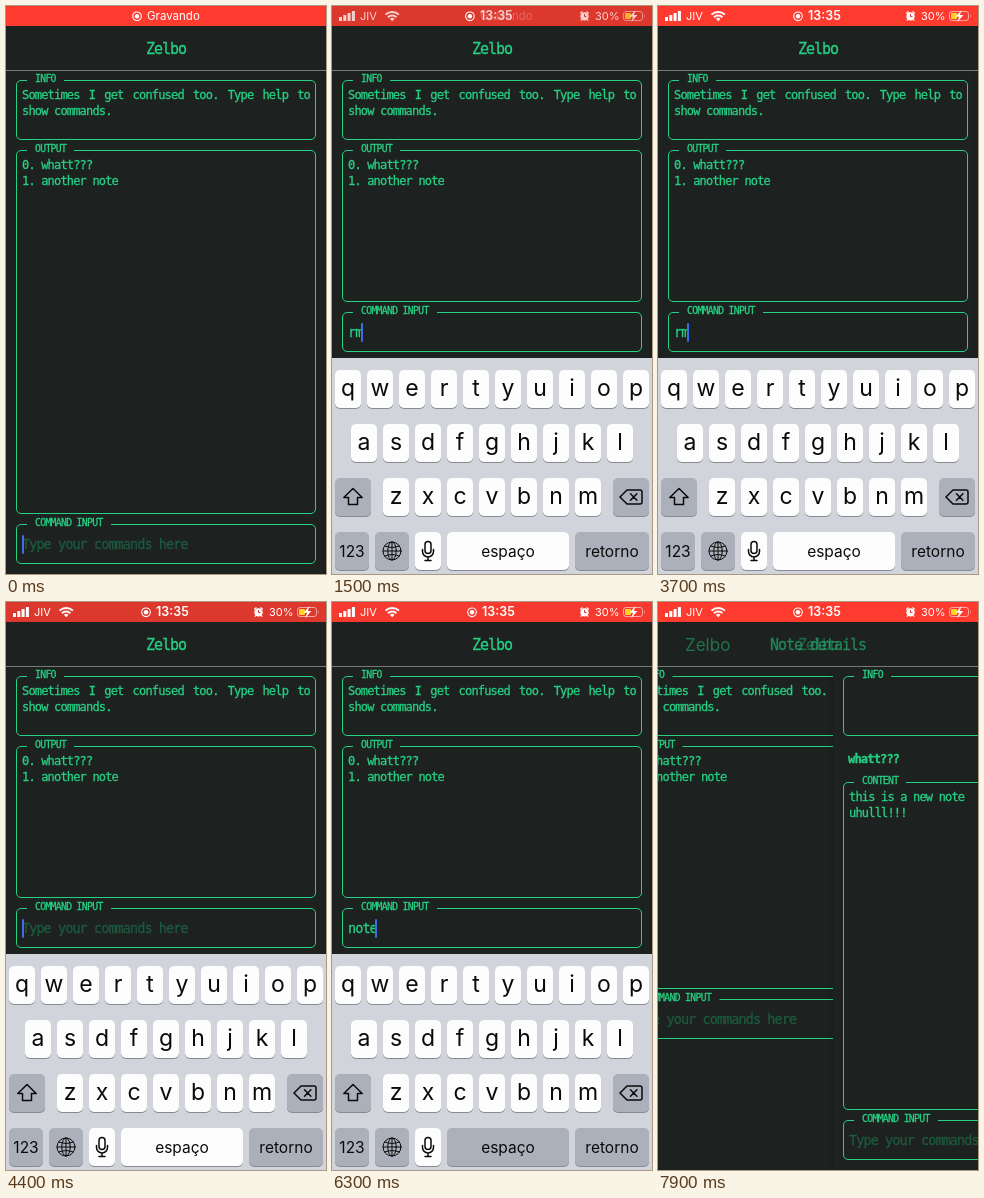
Write an HTML page that moves like this. It is 320x568 px and loops after 8 s.

```html
<!DOCTYPE html>
<html lang="pt">
<head>
<meta charset="utf-8">
<title>Terminal notes</title>
<style>
@property --kb { syntax: "<number>"; inherits: true; initial-value: 0; }
@property --lay { syntax: "<number>"; inherits: true; initial-value: 0; }
@property --push { syntax: "<number>"; inherits: true; initial-value: 0; }
@property --clock { syntax: "<number>"; inherits: true; initial-value: 0; }

html, body { margin: 0; width: 100%; height: 100%; overflow: hidden; background: #1d211f; }
#stage {
  --green: #25d184;
  --bg: #1d211f;
  position: absolute; left: 0; top: 0; width: 320px; height: 568px; overflow: hidden;
  background: var(--bg);
  animation: kb 8s infinite, lay 8s infinite, push 8s infinite, clock 8s linear infinite;
}
@keyframes kb {
  0%, .6% { --kb: 0; animation-timing-function: cubic-bezier(.2, .7, .3, 1); }
  5.5% { --kb: 1; }
  91.73% { --kb: 1; animation-timing-function: ease-in-out; }
  96%, 100% { --kb: 0; }
}
@keyframes lay {
  0%, .6% { --lay: 0; animation-timing-function: cubic-bezier(.2, .7, .3, 1); }
  5.5% { --lay: 1; }
  96.4% { --lay: 1; animation-timing-function: ease-in; }
  98.75% { --lay: .573; animation-timing-function: linear; }
  100% { --lay: .27; }
}
@keyframes push {
  0%, 96.4% { --push: 0; animation-timing-function: ease-in; }
  98.75% { --push: .45; animation-timing-function: linear; }
  100% { --push: .75; }
}
@keyframes clock {
  0%, 16% { --clock: 0; }
  19.6%, 100% { --clock: 1; }
}

/* Terminal type: each size has an advance of .5333em */
.term, .term * {
  font-family: "DejaVu Sans Mono", monospace;
  letter-spacing: calc(.5333em - 1ch);
  color: var(--green);
  -webkit-text-stroke: .3px;
}
.page { position: absolute; left: 0; top: 0; width: 320px; bottom: 0; background: var(--bg); }
#home { transform: translateX(calc(-96px * var(--push))); }
#home .panes { position: absolute; left: 0; right: 0; top: 0; bottom: calc(212px * var(--lay)); }
#detail { transform: translateX(calc(320px * (1 - var(--push)))); box-shadow: 0 0 5px #0003; }
.box {
  position: absolute; left: 10px; right: 10px; box-sizing: border-box;
  border: 1px solid var(--green); border-radius: 5px; padding: 6px 5px;
  font-size: 12px; line-height: 16px;
}
.box p { margin: 0; white-space: pre; }
.box p.fill { white-space: normal; text-align: justify; }
.box b {
  position: absolute; left: 10px; top: -9px; padding: 0 8px;
  font-size: 9.75px; line-height: 14px; font-weight: 400; background: var(--bg);
}
.info { top: 74px; height: 60px; }
.output { top: 144px; bottom: 60px; }
.content { top: 180px; bottom: 60px; }
.entry { bottom: 10px; height: 40px; padding: 0 5px; }
.entry p { font-size: 13.5px; line-height: 38px; }
.entry .hint { color: #1d5940; }
.name { position: absolute; left: 15px; top: 149px; font-size: 12px; line-height: 16px; font-weight: 700; }
#caret { position: absolute; top: 10px; width: 2px; height: 19px; border-radius: 1px; background: #3d6ce8; }

header { position: absolute; left: 0; top: 0; width: 320px; height: 64px; background: var(--bg); border-bottom: 1px solid #767b78; }
header div { position: absolute; top: 33px; width: 320px; text-align: center; font-size: 15px; line-height: 20px; }
#old { opacity: calc(1 - 1.4 * var(--push)); }
#new { opacity: calc(1.25 * var(--push)); }
header #back {
  left: 27px; width: auto; font: 17px/20px Inter, sans-serif; letter-spacing: 0;
  -webkit-text-stroke: 0; opacity: var(--push);
}

#status {
  position: absolute; left: 0; top: 0; width: 320px; height: 20px; color: #fff;
  background: color-mix(in srgb, #dc382e calc(var(--kb) * var(--dim, 0) * 100%), #ff3b30);
  font: 11px/20px Inter, sans-serif;
}
#status span, #status svg { position: absolute; top: 0; white-space: pre; }
#bars, .live { opacity: var(--clock); }
#rec { left: 0; transform: translateX(calc(126px + 9px * var(--clock))); }
#word { left: 15px; font-size: 11.5px; opacity: calc(1 - var(--clock)); }

#keys {
  position: absolute; left: 0; top: 352px; width: 320px; height: 216px; background: #d1d4da;
  transform: translateY(calc(217px * (1 - var(--kb))));
  font-family: Inter, sans-serif; color: #0a0a0b;
}
.key {
  position: absolute; height: 38px; box-sizing: border-box; border-radius: 5px;
  display: flex; align-items: center; justify-content: center;
  background: #fdfdfe; box-shadow: 0 1px 0 #888b91; font-size: 22px;
}
.key.letter { font-size: 23px; padding-bottom: 3px; }
.key.small { font-size: 15.5px; }
.key.tiny { font-size: 13.5px; }
.key.dark, .key.down { background: #abb0ba; }
#keys.sym .abc, #keys:not(.sym) .num { display: none; }
.key svg { fill: none; stroke: #0a0a0b; stroke-width: 1.5; stroke-linejoin: round; stroke-linecap: round; }
.key svg.thin { stroke-width: 1; }
</style>
</head>
<body>
<div id="stage">
  <div id="home" class="page term">
    <div class="panes">
      <div class="box info"><b>INFO</b><p class="fill">Sometimes I get confused too. Type help to show commands.</p></div>
      <div class="box output"><b>OUTPUT</b><p>0. whatt???
1. another note</p></div>
      <div class="box entry"><b>COMMAND INPUT</b><p id="typed"></p><i id="caret"></i></div>
    </div>
  </div>
  <div id="detail" class="page term">
    <div class="box info"><b>INFO</b></div>
    <div class="name">whatt???</div>
    <div class="box content"><b>CONTENT</b><p>this is a new note
uhulll!!!</p></div>
    <div class="box entry"><b>COMMAND INPUT</b><p class="hint">Type your commands here</p></div>
  </div>
  <header class="term">
    <div id="old">Zelbo</div>
    <div id="new">Note details</div>
    <div id="back">Zelbo</div>
  </header>
  <div id="status">
    <svg id="bars" width="320" height="20" fill="#fff">
      <path d="M7 11h3v4h-3zM11.3 9h3v6h-3zM15.6 7h3v8h-3zM19.9 5h3v10h-3z"/>
      <g fill="none" stroke="#fff" stroke-width="2">
        <path d="M53.5 8.6a9.6 9.6 0 0 1 13.4 0M56 11.2a6 6 0 0 1 8.4 0"/>
        <path d="M248.3 7.6l2.2-2M256.7 7.6l-2.2-2M249.8 13.4l-1 1.2M255.2 13.4l1 1.2" stroke-width="1.3"/>
      </g>
      <circle cx="252.5" cy="10.4" r="4.2"/>
      <path d="M252.5 8v2.600h2" fill="none" stroke="#dc382e"/>
      <path d="M60.2 15.2l-2.3-2.5a3.4 3.4 0 0 1 4.6 0z"/>
      <rect x="291.5" y="5.5" width="19" height="9" rx="2.5" fill="none" stroke="#fff" stroke-opacity=".55"/>
      <path d="M312 8.3q1.6 1.7 0 3.4z" opacity=".6"/>
      <rect x="293" y="7" width="6" height="6" rx="1" fill="#ffd426"/>
      <path d="M303.5 4l-6 6.8h3.5l-1.6 5.2 6-7h-3.5z"/>
    </svg>
    <span class="live" style="left:28px">JIV</span>
    <span class="live" style="left:263px">30%</span>
    <span id="rec">
      <svg width="12" height="20" style="left:0"><circle cx="5" cy="10.3" r="4.3" fill="none" stroke="#fff" stroke-width="1.1"/><circle cx="5" cy="10.3" r="2.2" fill="#fff"/></svg>
      <span id="word">Gravando</span>
      <span class="live" style="left:15px;font-size:12.5px;font-weight:600">13:35</span>
    </span>
  </div>
  <div id="keys"></div>
</div>
<script>
const $ = id => document.getElementById(id);
const keys = $('keys');
const ROWS = [12, 66, 120, 174];

function key(x, row, w, label, cls = '') {
  const k = document.createElement('div');
  k.className = 'key ' + cls;
  k.style.cssText = `left:${x}px;top:${ROWS[row]}px;width:${w}px`;
  k.innerHTML = label;
  keys.append(k);
  return k;
}
function keyRow(chars, row, x, cls, pitch = 32, w = 26) {
  [...chars].forEach((c, i) => key(x + i * pitch, row, w, c === '&' ? '&amp;' : c, cls));
}
const icon = (path, cls = '') => `<svg class="${cls}" width="24" height="24" viewBox="0 0 24 24">${path}</svg>`;

keyRow('qwertyuiop', 0, 3, 'abc letter');
keyRow('asdfghjkl', 1, 19, 'abc letter');
keyRow('zxcvbnm', 2, 51, 'abc letter');
keyRow('1234567890', 0, 3, 'num');
keyRow('-/:;()$&@”', 1, 3, 'num');
keyRow('.,?!’', 2, 51, 'num', 44.8, 39.6);
key(3, 2, 36, icon('<path d="M12 3.5L2.8 12.500h4.700v7h9v-7h4.700z"/>'), 'abc dark');
key(3, 2, 36, '#+=', 'num dark tiny');
key(281, 2, 36, icon('<path d="M8 5h13q2 0 2 2v10q0 2-2 2h-13l-7-7zM11.500 8.800l6.400 6.400M17.900 8.800l-6.400 6.400"/>'), 'dark');
key(3, 3, 34, '123', 'abc dark small');
key(3, 3, 34, 'ABC', 'num dark tiny');
key(43, 3, 34, icon('<circle cx="12" cy="12" r="9"/><ellipse cx="12" cy="12" rx="4.200" ry="9"/><path d="M12 3v18M3 12h18M4.800 7q7.200 3 14.400 0M4.800 17q7.200-3 14.400 0"/>', 'thin'), 'dark');
key(83, 3, 26, icon('<rect x="9" y="2.500" width="6" height="12" rx="3"/><path d="M6.500 10.500v2a5.500 5.500 0 0 0 11 0v-2M12 18v3.500M9 21.500h6"/>'));
const space = key(115, 3, 122, 'espaço', 'small');
key(243, 3, 74, 'retorno', 'dark small');

const EDITS = [
  [0, ''], [1050, 'r'], [1400, 'rm'], [1900, 'rm '], [3500, 'rm'], [3750, 'r'], [4000, ''],
  [4900, 'n'], [5350, 'no'], [5750, 'not'], [6050, 'note'], [6350, 'note '], [7000, 'note 0'], [7620, '']
];
const LOOP = 8000, BLUR = 7320, PULSE = 1480;
const within = (t, spans) => spans.some(([a, b]) => t >= a && t < b);
let start;

function draw(now) {
  start ??= now;
  const t = (now - start) % LOOP;
  const [since, text] = EDITS.findLast(e => e[0] <= t);
  const typed = $('typed'), caret = $('caret');
  const shown = text || 'Type your commands here';
  if (typed.textContent !== shown) typed.textContent = shown;
  typed.className = text ? '' : 'hint';
  caret.style.left = Math.round(4.8 + 6.8 * text.length) + 'px';
  caret.style.opacity = t < BLUR && (t - since) % 1000 < 600 ? 1 : 0;
  // The recording bar dims and brightens
  $('status').style.setProperty('--dim', Math.cos(Math.PI * t / PULSE) ** 4);
  keys.classList.toggle('sym', within(t, [[2300, 3250], [6700, LOOP]]));
  space.classList.toggle('down', within(t, [[1800, 1900], [6230, 6350]]));
  requestAnimationFrame(draw);
}
requestAnimationFrame(draw);
</script>
</body>
</html>
```
